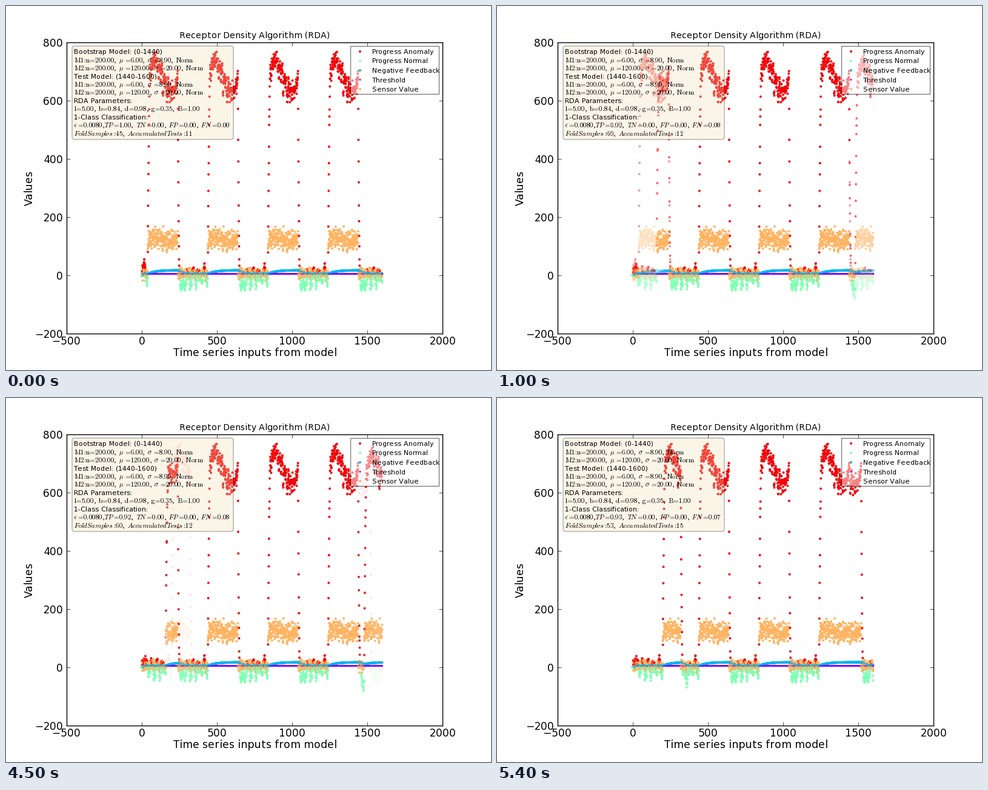
Recreate the animation shown at these times as a matplotlib script. Size 800 by 600 pixels, loop 8000 ms.

```python
import numpy as np
import matplotlib.pyplot as plt
from matplotlib.animation import FuncAnimation
from matplotlib.patches import FancyBboxPatch, Rectangle

plt.rcParams.update({"font.family": "DejaVu Sans", "mathtext.fontset": "cm",
                     "text.hinting_factor": 1})

LIMIT, DECAY, FB_DECAY, FB_GAIN = 5.0, 0.84, 0.98, 0.35
BLOCK, FOLD = 200, 160
PURPLE, BLUE, GREEN, ORANGE, _ = plt.cm.rainbow(np.linspace(0, 1, 5))
RED = (0.94, 0.02, 0.04, 1)


def wave(peak, period):
    return np.cos(2 * np.pi * (np.arange(BLOCK) - peak) / period)


def steady_noise(sd, seed):
    """Normal noise whose slow drift is taken out."""
    noise = np.random.default_rng(seed).normal(0, sd, BLOCK)
    return noise - np.convolve(noise, np.ones(21) / 21, "same")


def make_stream():
    """Four periods of a quiet block followed by a loud block."""
    ramp = 35 * np.exp(-np.arange(BLOCK) / 3)
    low = 6 - 4 * wave(44, 37) + steady_noise(8.5, 4)
    high = 124 + 6 * wave(45, BLOCK) - ramp + steady_noise(20, 7)
    return np.tile(np.concatenate([low.clip(-18, 28), high.clip(76, 168)]), 4)


def receptor(sensor):
    p = n = 0.0
    progress, feedback = [], []
    for value in sensor:
        n = FB_DECAY * n + FB_GAIN * (p > LIMIT)
        p = DECAY * p + value - n
        progress.append(p)
        feedback.append(n)
    return np.array(progress), np.array(feedback)


stream = make_stream()


def fold_series(k):
    cut = slice(k * FOLD, (k + 1) * FOLD)
    return np.concatenate([np.delete(stream, cut), stream[cut]])


def roman(name, value):
    return rf"\mathrm{{{name}}}\!=\!{value:.2f}"


def italic(name, value):
    return rf"{name}=\!{value:.2f}"


def math(*parts):
    return "$" + r",\ ".join(parts) + "$"


def model_line(name, mu, sigma):
    return math(roman(rf"{name}\!:\!n", 200), italic(r"\mu\,", mu),
                italic(r"\sigma\,", sigma), r"\mathrm{Norm}")


def info_lines(tp, fn, samples, tests):
    models = [model_line("M1", 6, 8.9), model_line("M2", 120, 20)]
    return ["Bootstrap Model: (0-1440)", *models,
            "Test Model: (1440-1600)", *models,
            "RDA Parameters:",
            math(roman("l", 5), roman("b", 0.84), roman("d", 0.98),
                 roman("g", 0.35), roman("B", 1)),
            "1-Class Classification:",
            math(r"\epsilon=\!0.0080,\!" + italic("TP", tp), italic("TN", 0),
                 italic("FP", 0), italic("FN", fn)),
            math(rf"FoldSamples:\!{samples}", rf"AccumulatedTests:\!{tests}")]


def draw_plot(k):
    ax = fig.add_axes([0.125, 0.1, 0.775, 0.8])
    sensor = fold_series(k)
    progress, feedback = receptor(sensor)
    count = len(sensor)

    # All four marks of one time step are stacked before the next step.
    values = np.column_stack([progress, feedback, np.full(count, LIMIT), sensor])
    colors = np.tile([RED, BLUE, PURPLE, ORANGE], (count, 1, 1))
    colors[progress <= LIMIT, 0] = GREEN
    ax.scatter(np.repeat(np.arange(count), 4), values.ravel(),
               s=np.tile([8, 8, 4, 8], count), c=colors.reshape(-1, 4),
               edgecolors="none")
    ax.scatter([-5], [0], s=8, color=GREEN, edgecolors="none")

    ax.set(xlim=(-500, 2000), ylim=(-200, 800))
    ax.set_xticks(range(-500, 2001, 500))
    ax.set_yticks(range(-200, 801, 200))
    ax.tick_params(direction="in", top=True, right=True, length=4, width=0.5,
                   pad=4, labelsize=12)
    ax.tick_params(axis="x", pad=3)
    for spine in ax.spines.values():
        spine.set_linewidth(1)


def draw_overlay(lines):
    """Titles, parameter box and legend, placed in pixels."""
    ax = fig.add_axes([0, 0, 1, 1])
    ax.set(xlim=(0, 800), ylim=(600, 0))
    ax.axis("off")
    ax.text(410, 53, "Receptor Density Algorithm (RDA)", size=10, ha="center")
    ax.text(411, 577, "Time series inputs from model", size=12, ha="center")
    ax.text(44, 300, "Values", size=12, ha="center", va="baseline",
            rotation=90, rotation_mode="anchor")

    ax.add_patch(FancyBboxPatch((113, 70), 258, 146, fc="wheat", ec="black",
                                boxstyle="round,pad=4", alpha=0.3, lw=1))
    for i, line in enumerate(lines):
        ax.text(112, 79 + 13.45 * i, line, size=8)

    ax.add_patch(Rectangle((567.5, 65.5), 146, 79, fc="white", ec="black",
                           alpha=0.5, lw=1))
    entries = [("Progress Anomaly", RED, 8), ("Progress Normal", GREEN, 8),
               ("Negative Feedback", BLUE, 8), ("Threshold", PURPLE, 4),
               ("Sensor Value", ORANGE, 8)]
    for i, (label, color, size) in enumerate(entries):
        y = 75 + 15.5 * i
        ax.scatter([584], [y], s=size, color=color, edgecolors="none", zorder=3)
        ax.text(604, y + 4, label, size=8)


def render(k, *scores):
    fig.clear()
    draw_plot(k)
    draw_overlay(info_lines(*scores))
    fig.canvas.draw()
    return np.array(fig.canvas.buffer_rgba())[..., :3] / 255


fig = plt.figure(figsize=(8, 6), dpi=100, facecolor="white")
views = [render(0, 1.00, 0.00, 45, 11),
         render(1, 0.92, 0.08, 60, 12),
         render(2, 0.93, 0.07, 53, 15)]

fig.clear()
stage = fig.add_axes([0, 0, 1, 1])
stage.axis("off")
picture = stage.imshow(views[0], aspect="auto", interpolation="nearest")


def update(frame):
    first, second = (np.clip((frame - start) / 10, 0, 1) for start in (4, 44))
    mix = views[0] * (1 - first) + views[1] * first
    picture.set_data(np.clip(mix * (1 - second) + views[2] * second, 0, 1))
    return [picture]


animation = FuncAnimation(fig, update, frames=80, interval=100, repeat=True,
                          repeat_delay=0)
plt.show()
```
